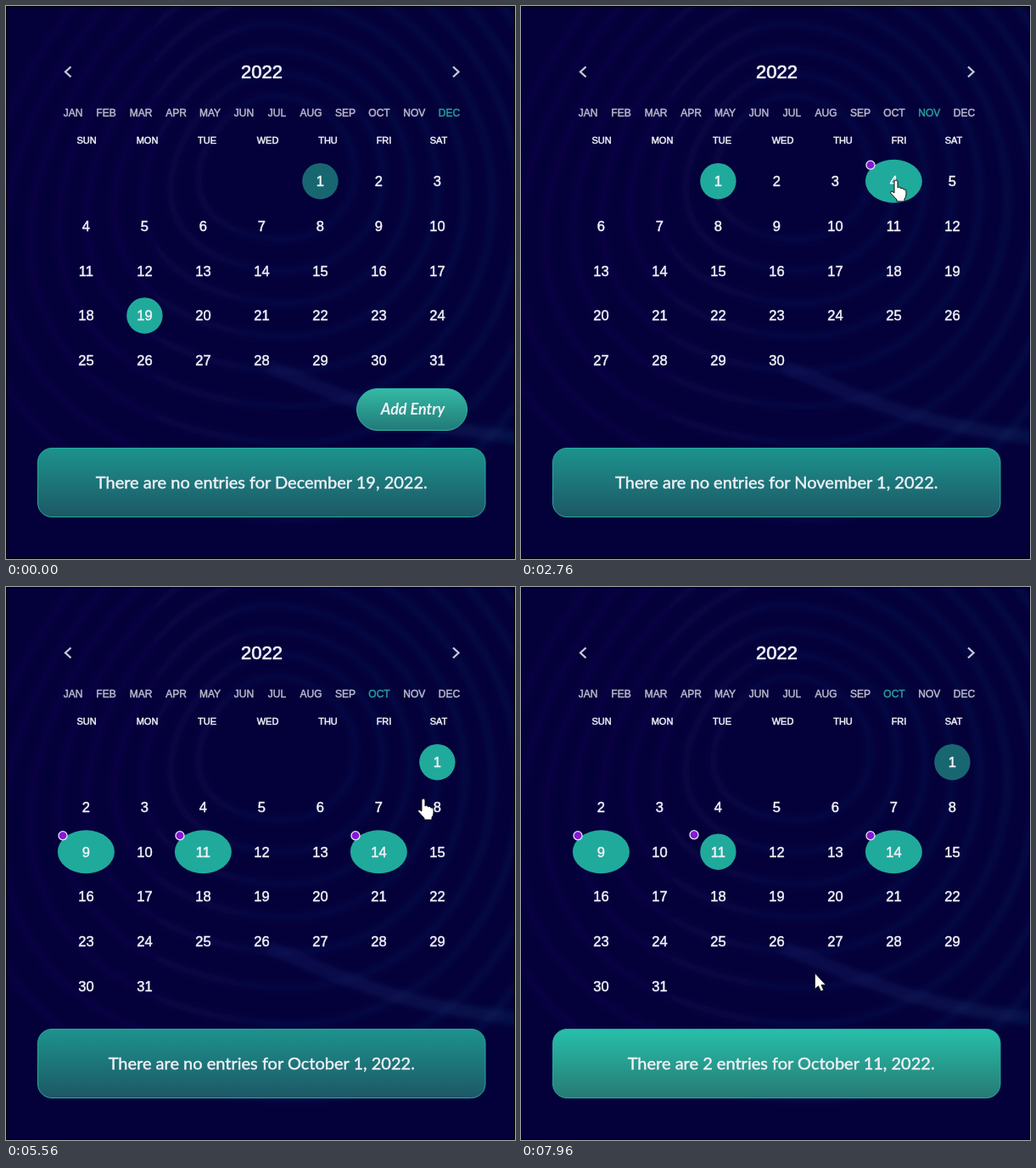
An HTML page for the animation above (8 s loop, 600 px wide and 651 px high).

```html
<!DOCTYPE html>
<html lang="en">
<head>
<meta charset="utf-8">
<title>Calendar</title>
<style>
  html, body { margin: 0; width: 100%; height: 100%; overflow: hidden; background: #04013a; }
  svg { display: block; width: 600px; height: 651px; }
  text { text-anchor: middle; fill: #f1f1f8; stroke: #f1f1f8; stroke-width: .5px; font-family: "Liberation Sans", Arial, sans-serif; }
  .year { font-size: 22px; stroke-width: .7px; }
  .month { font-size: 12px; fill: #b9b8ca; stroke: #b9b8ca; }
  .month.on { fill: #2a9d98; stroke: #2a9d98; }
  .weekday { font-size: 11px; stroke-width: .5px; }
  .day { font-size: 16.5px; }
  .message { font: 20px Lato, sans-serif; stroke-width: .45px; }
  .add { font: italic 700 18px Lato, sans-serif; stroke: none; }
  .arrow { fill: none; stroke: #c9c8d6; stroke-width: 2.3; }
  .first { fill: #186770; }
  .marked { fill: #20aa9b; }
  .dot { fill: #8418d6; stroke: #eee6fa; stroke-width: 1.3; }
  .contour { fill: none; stroke: url(#lineTint); stroke-width: 9; opacity: .09; }
  .band { stroke-width: 16; opacity: .16; }
  .pointer { fill: #fff; stroke: #111; stroke-width: 1; stroke-linejoin: round; }
</style>
</head>
<body>
<svg viewBox="0 0 600 651">
  <defs>
    <linearGradient id="lineTint" gradientUnits="userSpaceOnUse" x1="0" y1="0" x2="600" y2="0">
      <stop offset="0" stop-color="#3c159a"/><stop offset=".5" stop-color="#28389c"/><stop offset="1" stop-color="#1c689a"/>
    </linearGradient>
    <linearGradient id="quiet" x2="0" y2="1">
      <stop offset="0" stop-color="#1d938d"/><stop offset="1" stop-color="#1c5865"/>
    </linearGradient>
    <linearGradient id="bright" x2="0" y2="1">
      <stop offset="0" stop-color="#27c0aa"/><stop offset="1" stop-color="#267a74"/>
    </linearGradient>
    <linearGradient id="button" x2="0" y2="1">
      <stop offset="0" stop-color="#34baa5"/><stop offset="1" stop-color="#217a78"/>
    </linearGradient>
    <filter id="soft" filterUnits="userSpaceOnUse" x="0" y="0" width="600" height="651"><feGaussianBlur stdDeviation="3"/></filter>
  </defs>

  <rect width="600" height="651" fill="#04013a"/>
  <g id="contours" filter="url(#soft)"></g>
  <rect x=".5" y=".5" width="599" height="650" fill="none" stroke="#000"/>

  <path class="arrow" d="M76.5 71.5 70 77.5 76.5 83.5M527 71.5 533.5 77.5 527 83.5"/>
  <text class="year" x="301.5" y="85">2022</text>
  <g id="months"></g>
  <g id="weekdays"></g>
  <g id="days"></g>

  <g id="add">
    <rect x="413.5" y="450.5" width="130" height="49" rx="24.5" fill="url(#button)" stroke="#30b8a4"/>
    <text class="add" x="479.5" y="481">Add Entry</text>
  </g>
  <rect id="panel" x="37.5" y="520.5" width="527.5" height="81" rx="16.5" stroke="#27a99b"/>
  <text id="message" class="message" y="568"></text>

  <g id="cursor" class="pointer">
    <path id="hand" d="M-2 2Q-2 0 0 0T2 2V9Q3 7.500 5 8.500L5.500 9.800Q7 8.500 8.500 10L9 11Q12 10 12 13V17Q12 20 10 22V25H1V23L-6 15.500Q-7 13.500-5 13L-2 15Z"/>
    <path id="arrow" d="M-.7-1.500V17.500L3.500 13.800 6.500 20 9.800 18.500 7 12.500H12.500Z"/>
  </g>
</svg>
<script>
const LOOP = 8000;
const MONTHS = ["January", "February", "March", "April", "May", "June", "July",
  "August", "September", "October", "November", "December"];
const MONTH_X = [79, 118, 159, 200.5, 240.5, 280.5, 319.5, 359.5, 400, 440, 481.3, 522.5];
const WEEKDAYS = ["SUN", "MON", "TUE", "WED", "THU", "FRI", "SAT"];
const WEEKDAY_X = [95, 166.5, 237, 308.5, 379.5, 445.5, 510];
const ENTRIES = { 9: { 9: 1, 11: 2, 14: 1 }, 10: { 4: 5 }, 11: {} };

// Selections: time, month, day
const STATES = [[0, 11, 19], [1760, 10, 1], [3040, 10, 4], [4800, 9, 1], [6440, 9, 9], [7560, 9, 11]];

// Pointer stops: time, x, y
const STOPS = [
  [880, 562, 300], [1520, 488, 126], [1760, 488, 126], [2520, 442, 205], [3080, 442, 205],
  [3800, 329, 553], [4000, 329, 553], [4200, 331, 556], [4720, 440, 125], [4880, 440, 125],
  [5560, 492, 249], [5680, 490, 251], [6280, 95, 306], [6520, 95, 306],
  [7280, 234, 385], [7480, 233, 308], [7600, 233, 308], [7960, 347, 456]
];

const $ = id => document.getElementById(id);

function add(parent, tag, attrs, text) {
  const el = document.createElementNS("http://www.w3.org/2000/svg", tag);
  for (const key in attrs) el.setAttribute(key, attrs[key]);
  if (text !== undefined) el.textContent = text;
  return parent.appendChild(el);
}

// Nested rings whose left side leans towards the lower corner
function drawContours() {
  const group = $("contours");
  for (let k = 0; k < 9; k++) {
    let d = "";
    for (let i = 0; i < 90; i++) {
      const a = i / 90 * Math.PI * 2;
      const r = (88 + 31 * k) * (1 + .05 * Math.sin(2 * a + 1));
      const y = r * Math.sin(a) * (1 + .02 * k);
      const lean = .25 * y * Math.max(0, -Math.cos(a));
      d += (i ? "L" : "M") + (320 + r * Math.cos(a) - lean).toFixed(1) + " " + (190 + 5 * k + y).toFixed(1);
    }
    add(group, "path", { class: "contour", d: d + "Z" });
  }
  add(group, "path", { class: "contour band", d: "M310 425C390 455 460 495 610 508" });
}

const firstColumn = month => new Date(2022, month, 1).getDay();
const monthLength = month => new Date(2022, month + 1, 0).getDate();

function drawDays(month, selected) {
  const days = $("days");
  days.replaceChildren();
  for (let day = 1; day <= monthLength(month); day++) {
    const slot = firstColumn(month) + day - 1;
    const x = 94.4 + 69 * (slot % 7), y = 206.2 + 52.75 * Math.floor(slot / 7);
    const picked = day === selected, busy = ENTRIES[month][day];
    if (picked || day === 1) add(days, "circle", { class: picked ? "marked" : "first", cx: x, cy: y, r: 21.2 });
    else if (busy) add(days, "ellipse", { class: "marked", cx: x, cy: y, rx: 33.5, ry: 25.5 });
    if (busy) add(days, "circle", { class: "dot", cx: x - (picked ? 28.4 : 27.4), cy: y - (picked ? 20 : 19), r: 5 });
    add(days, "text", { class: "day", x, y: y + 5.8 }, day);
  }
}

function showState([, month, day]) {
  const count = ENTRIES[month][day] || 0, one = count === 1;
  drawDays(month, day);
  $("add").style.display = month === 11 ? "" : "none";
  $("panel").setAttribute("fill", count ? "url(#bright)" : "url(#quiet)");
  $("message").setAttribute("x", count ? 306.7 : 301.3);
  $("message").textContent =
    `There ${one ? "is" : "are"} ${count || "no"} ${one ? "entry" : "entries"} for ${MONTHS[month]} ${day}, 2022.`;
}

function pointerAt(t) {
  if (t < STOPS[0][0]) return null;
  const next = STOPS.findIndex(stop => stop[0] > t);
  if (next < 0) return STOPS.at(-1).slice(1);
  const [t0, x0, y0] = STOPS[next - 1], [t1, x1, y1] = STOPS[next];
  const u = (t - t0) / (t1 - t0), e = u * u * (3 - 2 * u);
  return [x0 + (x1 - x0) * e, y0 + (y1 - y0) * e];
}

const monthUnder = (x, y) => y > 116 && y < 135 ? MONTH_X.findIndex(cx => Math.abs(cx - x) < 16) : -1;

function isClickable(x, y, month) {
  if (monthUnder(x, y) >= 0 || (y > 520 && y < 602)) return true;
  const col = Math.floor((x - 60) / 69), row = Math.floor((y - 180) / 52.75);
  const day = row * 7 + col - firstColumn(month) + 1;
  return row >= 0 && col >= 0 && col < 7 && day > 0 && day <= monthLength(month);
}

MONTHS.forEach((name, i) => add($("months"), "text", { class: "month", x: MONTH_X[i], y: 129.6 }, name.slice(0, 3).toUpperCase()));
WEEKDAYS.forEach((name, i) => add($("weekdays"), "text", { class: "weekday", x: WEEKDAY_X[i], y: 162 }, name));
drawContours();

let shown;
function render(t) {
  const state = STATES.findLast(s => s[0] <= t), month = state[1];
  if (state !== shown) showState(shown = state);
  const point = pointerAt(t);
  const hovered = point ? monthUnder(...point) : -1;
  [...$("months").children].forEach((el, i) => el.classList.toggle("on", i === month || i === hovered));
  $("cursor").style.display = point ? "" : "none";
  if (!point) return;
  const hand = isClickable(...point, month);
  $("hand").style.display = hand ? "" : "none";
  $("arrow").style.display = hand ? "none" : "";
  $("cursor").setAttribute("transform", `translate(${point})`);
}

const start = performance.now();
function tick() {
  render((performance.now() - start) % LOOP);
  requestAnimationFrame(tick);
}
tick();
</script>
</body>
</html>
```
